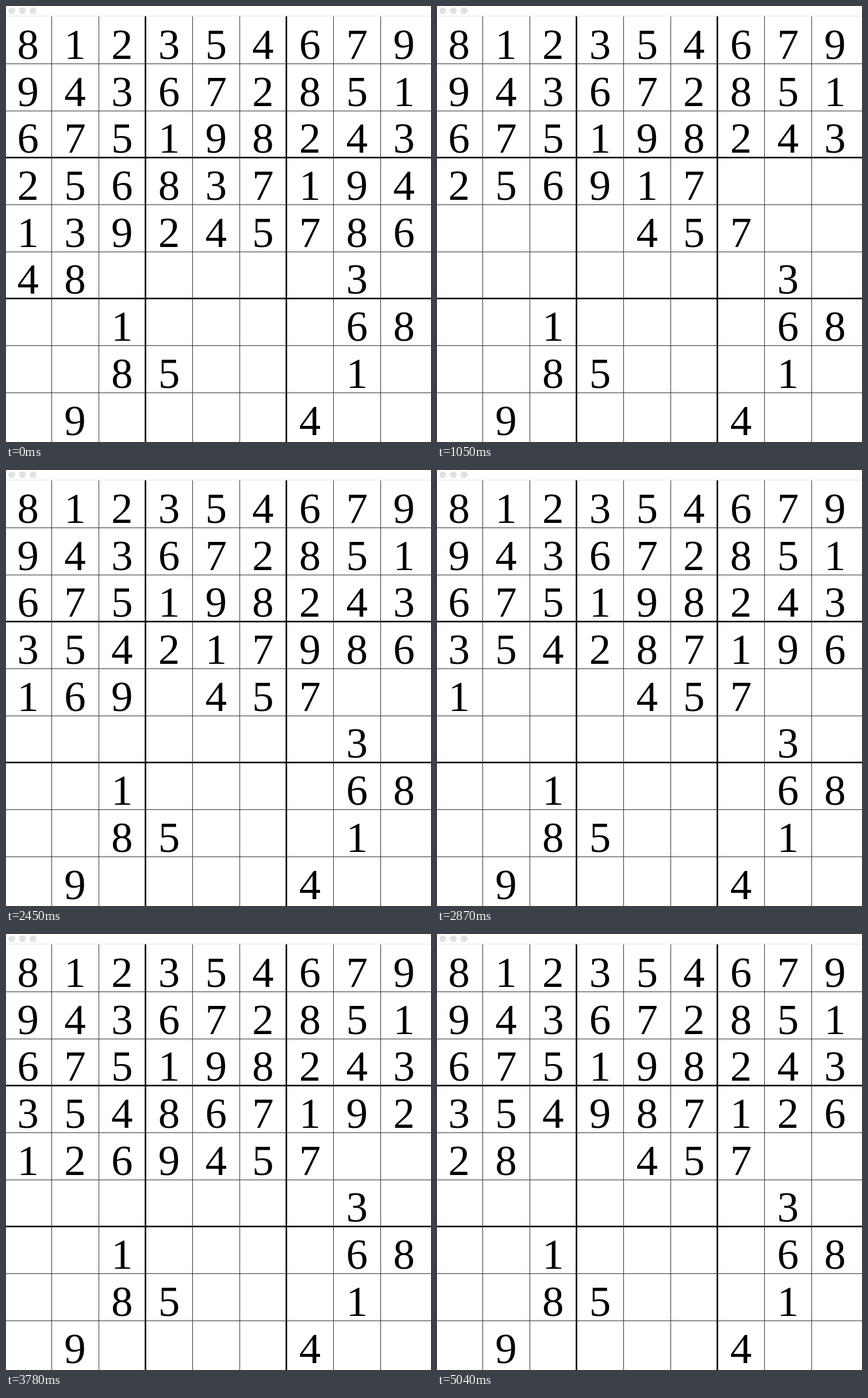
An HTML page with a canvas that plays this animation: 739x758 px, repeating every 5110 ms.

```html
<!DOCTYPE html>
<html lang="en">
<head>
<meta charset="utf-8">
<title>Sudoku backtracking</title>
<style>
  html, body { margin: 0; width: 100%; height: 100%; overflow: hidden; background: #fff; }
  canvas { display: block; }
</style>
</head>
<body>
<canvas id="stage" width="739" height="758"></canvas>
<script>
const ctx = document.getElementById('stage').getContext('2d');
const TICK = 70, TICKS = 73;
const LEFT = -2.8, TOP = 18.2, CELL = 81.7;

// The upper three rows are already settled while the search works on the rest.
const START = ('812354679 943672851 675198243 ' +
               '.5...7... ....457.. .......3. ' +
               '..1....68 ..85...1. .9....4..').replace(/ /g, '');

// Tick and contents of the open rows at which the search passes known positions.
const CHECKPOINTS = [
  [0,  '256837194 139245786 48.....3. ..1....68'],
  [15, '256917... ....457.. .......3. ..1....68'],
  [25, '256937184 139845726 784216935 5217...68'],
  [35, '354217986 169.457.. .......3. ..1....68'],
  [46, '354817926 18..457.. .......3. ..1....68'],
  [54, '354867192 1269457.. .......3. ..1....68'],
  [72, '354987126 28..457.. .......3. ..1....68'],
].map(([tick, rows]) => ({
  tick,
  board: START.slice(0, 27) + rows.replace(/ /g, '') + START.slice(63),
}));

function fits(board, cell, digit) {
  const row = Math.floor(cell / 9), col = cell % 9;
  const boxRow = row - row % 3, boxCol = col - col % 3;
  for (let i = 0; i < 9; i++) {
    if (board[row * 9 + i] === digit || board[i * 9 + col] === digit) return false;
    if (board[(boxRow + Math.floor(i / 3)) * 9 + boxCol + i % 3] === digit) return false;
  }
  return true;
}

// Depth-first search that yields the board after every placement and removal.
function* search(board) {
  const cell = board.indexOf('.');
  if (cell < 0) return;
  for (const digit of '123456789') {
    if (!fits(board, cell, digit)) continue;
    board[cell] = digit;
    yield board.join('');
    yield* search(board);
    board[cell] = '.';
    yield board.join('');
  }
}

function recordHistory() {
  const history = [];
  let next = 0;
  for (const state of search([...START])) {
    const point = CHECKPOINTS[next];
    if (state === point.board) {
      point.step = history.length;
      next++;
    }
    if (next > 0) history.push(state);
    if (next === CHECKPOINTS.length) break;
  }
  return history;
}

const history = recordHistory();

function boardAt(tick) {
  const i = Math.max(1, CHECKPOINTS.findIndex(point => point.tick >= tick));
  const a = CHECKPOINTS[i - 1], b = CHECKPOINTS[i];
  const share = (tick - a.tick) / (b.tick - a.tick);
  return history[Math.round(a.step + (b.step - a.step) * share)];
}

function drawWindow() {
  ctx.fillStyle = '#fff';
  ctx.fillRect(0, 0, 739, 758);
  ctx.fillStyle = '#e2e2e2';
  for (const x of [10, 28.5, 47]) {
    ctx.beginPath();
    ctx.arc(x, 8.3, 6, 0, Math.PI * 2);
    ctx.fill();
  }
  ctx.fillRect(0, 17, 739, 1);
}

function drawGrid() {
  for (const thick of [false, true]) {
    ctx.fillStyle = thick ? '#000' : '#2c2c2c';
    const width = thick ? 2.6 : 1, shift = thick ? 0.8 : 0;
    for (let i = 1; i < 9; i++) {
      if ((i % 3 === 0) !== thick) continue;
      ctx.fillRect(Math.round(LEFT + i * CELL) - shift, 18, width, 740);
      ctx.fillRect(0, Math.round(TOP + i * CELL) - shift, 739, width);
    }
  }
}

function drawDigits(board) {
  ctx.fillStyle = '#000';
  ctx.font = '75px "Liberation Serif", serif';
  ctx.textAlign = 'center';
  [...board].forEach((digit, cell) => {
    if (digit === '.') return;
    const col = cell % 9, row = Math.floor(cell / 9);
    ctx.fillText(digit, LEFT + (col + 0.5) * CELL + 0.3, TOP + row * CELL + 73.7);
  });
}

function draw() {
  const tick = Math.floor(performance.now() / TICK) % TICKS;
  drawWindow();
  drawGrid();
  drawDigits(boardAt(tick));
  requestAnimationFrame(draw);
}
draw();
</script>
</body>
</html>
```
